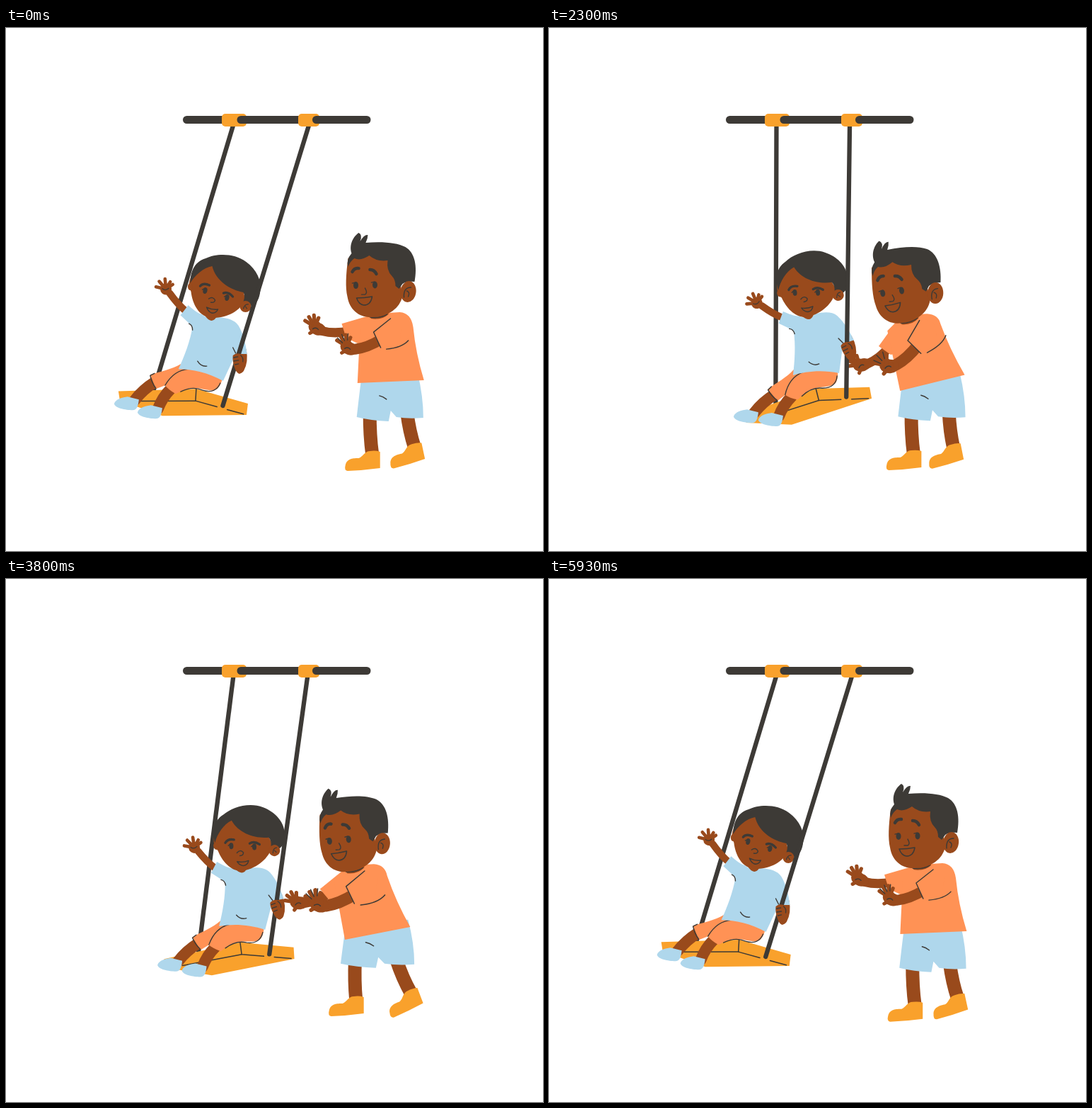
Write an HTML page with a canvas that moves like this. It is 759 px wide and 738 px high and loops after 6.01 s.

```html
<!DOCTYPE html>
<html lang="en">
<head>
<meta charset="utf-8">
<title>Swing</title>
<style>
  html, body { margin: 0; width: 100%; height: 100%; overflow: hidden; background: #fff; }
  canvas { display: block; }
</style>
</head>
<body>
<canvas id="stage" width="759" height="738"></canvas>
<script>
const ctx = document.getElementById('stage').getContext('2d');
const DARK = '#3d3a36', GOLD = '#f9a12c', SKIN = '#994a1c', CORAL = '#ff9255', BLUE = '#afd7ec';
const LOOP = 6010;
const SEAT = [268, 509];
const RAD = Math.PI / 180;

// Smooth hill from 0 to 1 and back, repeating with the loop.
function bump(t, center, width) {
  const d = (t - center + LOOP * 1.5) % LOOP - LOOP / 2;
  return Math.exp(-((d / width) ** 2));
}

const swingAt = t => bump(t, 2785, 1265);

// All motion follows from a few drivers.
function pose(t) {
  const g = swingAt(t), step = bump(t, 4000, 1300) - 0.08;
  return {
    g, step,
    seatX: SEAT[0] + 110 * g + 19 * g * g,
    seatY: SEAT[1] + 18.6 * g - 21.5 * g * g,
    ride: -20.5 * g,
    nod: -24 * swingAt(t - 180),
    wave: 3 + 6 * Math.cos((t - 4200) / LOOP * 2 * Math.PI),
    lift: bump(t, 4400, 1000),
    slide: -8 * swingAt(t - 250),
    upper: [-23 * g - 28 * step, 2.5 * g],
    nearArm: -24 * swingAt(t + 150) + 10 * step,
    farArm: -44 * g
  };
}

const add = (p, x, y) => [p[0] + x, p[1] + y];
const mid = (p, q) => [(p[0] + q[0]) / 2, (p[1] + q[1]) / 2];
const mix = (p, q, k) => [p[0] + (q[0] - p[0]) * k, p[1] + (q[1] - p[1]) * k];

function rotate([x, y], [cx, cy], deg) {
  const c = Math.cos(deg * RAD), s = Math.sin(deg * RAD), dx = x - cx, dy = y - cy;
  return [cx + c * dx - s * dy, cy + s * dx + c * dy];
}

function turned(x, y, deg, draw, scale = 1) {
  ctx.save();
  ctx.translate(x, y);
  ctx.rotate(deg * RAD);
  ctx.scale(scale, scale);
  ctx.translate(-x, -y);
  draw();
  ctx.restore();
}

function moved(x, y, draw) {
  ctx.save();
  ctx.translate(x, y);
  draw();
  ctx.restore();
}

function fill(color, d) {
  ctx.fillStyle = color;
  ctx.fill(new Path2D(d));
}

function ink(d, width = 1.4, color = DARK) {
  ctx.strokeStyle = color;
  ctx.lineWidth = width;
  ctx.stroke(new Path2D(d));
}

const joined = pts => 'M' + pts.map(p => p.join()).join('L');
const poly = (color, ...pts) => fill(color, joined(pts) + 'Z');
const line = (color, width, ...pts) => ink(joined(pts), width, color);
const limb = (a, bend, b, width) => ink(`M${a}Q${bend} ${b}`, width, SKIN);

function oval(color, x, y, rx, ry = rx, turn = 0) {
  ctx.fillStyle = color;
  ctx.beginPath();
  ctx.ellipse(x, y, rx, ry, turn, 0, 7);
  ctx.fill();
}

// Palm with four fingers fanned out evenly.
function hand(x, y, r, first, spread) {
  oval(SKIN, x, y, r);
  for (let i = 0; i < 4; i++) {
    const a = (first + spread * i) * RAD, reach = r * (i === 3 ? 1.5 : 1.8);
    line(SKIN, r * 0.58, [x, y], [x + Math.cos(a) * reach, y + Math.sin(a) * reach]);
  }
}

function drawBar() {
  const y = 129.5;
  const bracket = (x, w) => {
    ctx.fillStyle = GOLD;
    ctx.beginPath();
    ctx.roundRect(x, 121, w, 18, 5);
    ctx.fill();
  };
  line(DARK, 11, [255.5, y], [318, y]);
  bracket(305, 35);
  line(DARK, 11, [332, y], [425, y]);
  bracket(413, 30);
  line(DARK, 11, [438.5, y], [510, y]);
}

// Everything on the swing turns with the seat.
function riding(p, draw) {
  moved(p.seatX - SEAT[0], p.seatY - SEAT[1], () => turned(...SEAT, p.ride, draw));
}

function drawRope(p, topX, end) {
  const tip = add(rotate(end, SEAT, p.ride), p.seatX - SEAT[0], p.seatY - SEAT[1]);
  line(DARK, 6.3, [topX, 136], tip);
}

function drawSeat() {
  const M = [267, 526], R = [341, 530], R2 = [339, 546], L2 = [160, 525];
  poly(GOLD, [158, 512], SEAT, R, R2, [220, 547], L2);
  line(DARK, 1.5, SEAT, M, mix(M, R2, 0.42));
  line(DARK, 1.5, mix(M, R2, 0.62), mix(M, R2, 0.94));
  line(DARK, 1.5, M, [182, 526]);
}

function girlShin(p, knee, ankle) {
  turned(...knee, -p.ride, () => {
    limb(knee, add(mid(knee, ankle), -3, -2), ankle, 16);
    moved(...ankle, () => fill(BLUE, 'M-29 5C-27-2-17-4-10-5L6-1C5 8 3 14-3 14C-13 14-28 11-29 5Z'));
  });
}

function drawGirlLegs(p) {
  girlShin(p, [210, 499], [181, 525]);
  girlShin(p, [232, 509], [214, 537]);
  fill(CORAL, 'M203 489C215 485 235 481 246 474L302 478C307 489 306 500 298 509C290 515 276 507 262 508'
    + 'C252 509 245 513 239 516C232 512 227 508 224 504L211 509Z');
  ink('M211 508Q205 500 203 490L209 487');
  ink('M224 504C231 492 241 482 258 481');
  ink('M302 501C298 511 289 515 277 511C266 506 254 509 246 513');
}

function drawGirlBody(p) {
  turned(250, 396, p.wave - 4, () => {
    limb([253, 399], [243, 390], [232, 373], 10);
    hand(227, 367, 8, 196, 36);
    line(SKIN, 4.6, [227, 367], [237, 361]);
    ink('M222 366Q226 370 231 366', 1.2);
  });
  limb([333, 455], [336, 470], [330, 481], 12);
  fill(BLUE, 'M257 391C264 397 270 402 276 404Q289 414 299 408C312 409 323 412 328 420C335 432 338 446 340 460'
    + 'L324 460L306 498C285 486 262 481 243 481C251 464 260 441 263 421L246 405Z');
  fill(SKIN, 'M280 405Q289 419 297 408Z');
  ink('M258 417Q263 419 263 426');
  ink('M270 470Q275 478 283 477');
  ink('M320 451Q322 455 324 459');
}

function drawGirlHead() {
  fill(SKIN, 'M264 345C256 360 258 364 261 372C263 389 272 409 292 409C313 409 330 399 338 384L330 350L290 330Z');
  oval(SKIN, 260, 365, 3.5, 5);
  fill(DARK, 'M260 360C260 345 265 330 282 325C296 318 322 317 339 330C354 341 361 357 359 370C358 382 354 389 346 392'
    + 'L335 386Q338 378 335 373C317 370 296 357 291 336C279 338 266 349 260 360Z');
  oval(SKIN, 338, 393, 8);
  ink('M335 396Q337 389 342 390M338 393L340 396', 1.2);
  ink('M274 364Q279 359 287 363M307 374Q314 372 320 379', 3.4);
  oval(DARK, 281, 370.5, 3, 4.5, 0.25);
  oval(DARK, 312, 380.5, 3, 4.5, 0.25);
  ink('M277 369L281 367M308 379L312 377');
  ink('M286 382Q292 378 295 384Q294 388 289 387');
  ink('M283 394Q291 398 299 397Q296 403 290 402Q285 400 283 394Z');
}

function drawFist() {
  fill(SKIN, 'M320 462Q325 457 334 461Q337 468 336 476Q335 487 329 488Q324 486 322 478Q319 470 320 462Z');
  ink('M321 465L327 464M321 470L328 469M323 475L328 474M331 462Q335 465 334 471', 1.3);
}

// A leg and its shoe, given the heel and its turn.
function boyLeg(hip, heel, deg) {
  const foot = rotate(add(heel, -11, -20), heel, deg);
  limb(hip, add(mid(hip, foot), -2, 2), foot, 19);
  turned(...heel, deg, () => moved(...heel, () =>
    fill(GOLD, 'M0-24L0-1Q-22 2-46 3Q-51 2-49-5C-47-15-37-15-30-15C-24-17-22-25-14-25Q-6-26 0-24Z')));
}

function drawBoyLegs({ step, lift, slide }) {
  const dx = -20 * step, dy = -7 * step, wide = 1 + 0.12 * step;
  const hip = x => [543 + dx + (x - 543) * wide, 543 + dy];
  boyLeg(hip(514.5), [529 - 26 * step, 622 - 9 * step], 0);
  boyLeg(hip(567), [592 + slide + 5 * lift, 610 - 15 * lift], -11 - 14 * lift);
  ctx.save();
  ctx.translate(543 + dx, dy);
  ctx.scale(wide, 1);
  ctx.translate(-543, 0);
  fill(BLUE, 'M503 490L582 487Q590 520 590 550Q570 552 552 549L544 540L541 555Q516 554 496 549Q499 522 503 490Z');
  ink('M528 519Q533 520 538 524');
  ctx.restore();
}

function boyHand(x, y, lined) {
  moved(x, y, () => {
    oval(SKIN, 4, 3, 12, 9, 0.3);
    hand(0, 0, 9, 212, 27);
    line(SKIN, 5, [2, 4], [-7, 9]);
    ink('M-3 3Q2 0 5 4', 1.3);
    if (lined) ink('M-13-12L-6-5M-7-17L-3-8M2-18L1-9', 1.3);
  });
}

function drawBoyBody(p) {
  const { g, step, upper: [ux, uy] } = p;
  const top = (x, y) => [x + ux, y + uy];
  const hem = (x, y) => add(rotate([x, y], [544, 499], -13 * g - 2 * step), -21 * step, 2 * g);
  const right = hem(591, 497), shoulder = top(576, 422 - 8 * g);

  moved(ux, uy, () => turned(525, 412, p.farArm, () => {
    limb([486, 427], [466, 432], [447, 427], 13);
    boyHand(437, 421, false);
    fill(CORAL, 'M475 417L517 405L540 425L500 446L481 437Z');
  }));

  fill(CORAL, `M${hem(497, 501)}L${right}Q${add(mid(right, shoulder), -4, 0)} ${shoulder}`
    + `Q${top(573, 402)} ${top(557, 401)}L${top(541, 402)}Q${top(529, 412)} ${top(515, 411)}L${top(501, 425)}Z`);

  moved(ux, uy, () => turned(545, 404, p.nearArm, () => {
    limb([531, 439], [511, 451], [494, 453], 15);
    fill(CORAL, 'M545 404L519 429L531 453L556 447L560 420Z');
    ink('M544 410L520 429L530 451M538 453Q560 451 569 441');
    boyHand(482, 449, true);
  }, 1 + 0.08 * (g + step)));
}

function drawBoyHead() {
  fill(SKIN, 'M516 400L541 396L541 404Q531 413 516 410Z');
  ink('M515 408Q529 410 539 404');
  fill(SKIN, 'M484 325C481 348 480 366 483 379C486 398 500 409 518 408C541 407 557 396 561 378L552 325L510 310Z');
  fill(DARK, 'M484 337Q481 327 489 318C485 305 492 294 499 289Q505 292 501 301Q507 291 512 292Q512 297 509 303'
    + 'C533 301 553 303 565 309C579 317 582 337 578 358Q567 357 561 361L556 368L551 364Q551 355 546 350'
    + 'Q538 342 540 328Q524 330 514 321Q502 329 493 325Q487 329 484 337Z');
  oval(SKIN, 569, 372, 11, 15, 0.15);
  ink('M563 380Q562 366 573 366M567 371Q572 373 569 379');
  ink('M490 344Q493 338 499 339M515 341Q521 341 524 347', 4.5);
  oval(DARK, 495, 363, 3.5, 5);
  oval(DARK, 522, 362.5, 3.5, 5);
  ink('M490 360L494 359M517 359L521 358');
  ink('M508 367Q512 374 508 376L503 376');
  ink('M496 381Q507 381 518 379Q516 391 506 391Q499 390 496 381Z', 1.5);
}

function frame(t) {
  const p = pose(t);
  ctx.fillStyle = '#fff';
  ctx.fillRect(0, 0, 759, 738);
  ctx.lineCap = ctx.lineJoin = 'round';

  drawBoyLegs(p);
  drawBoyBody(p);
  moved(...p.upper, () => turned(568, 372, -8.3 * p.g, drawBoyHead));

  drawRope(p, 321.5, [208, 510]);
  riding(p, () => {
    drawSeat();
    drawGirlLegs(p);
    drawGirlBody(p);
    turned(310, 370, p.nod - p.ride, drawGirlHead);
  });
  drawRope(p, 428.5 - 4 * p.g, [305.5, 533]);
  riding(p, drawFist);
  drawBar();
}

const start = performance.now();
function tick() {
  frame((performance.now() - start) % LOOP);
  requestAnimationFrame(tick);
}
tick();
</script>
</body>
</html>
```
